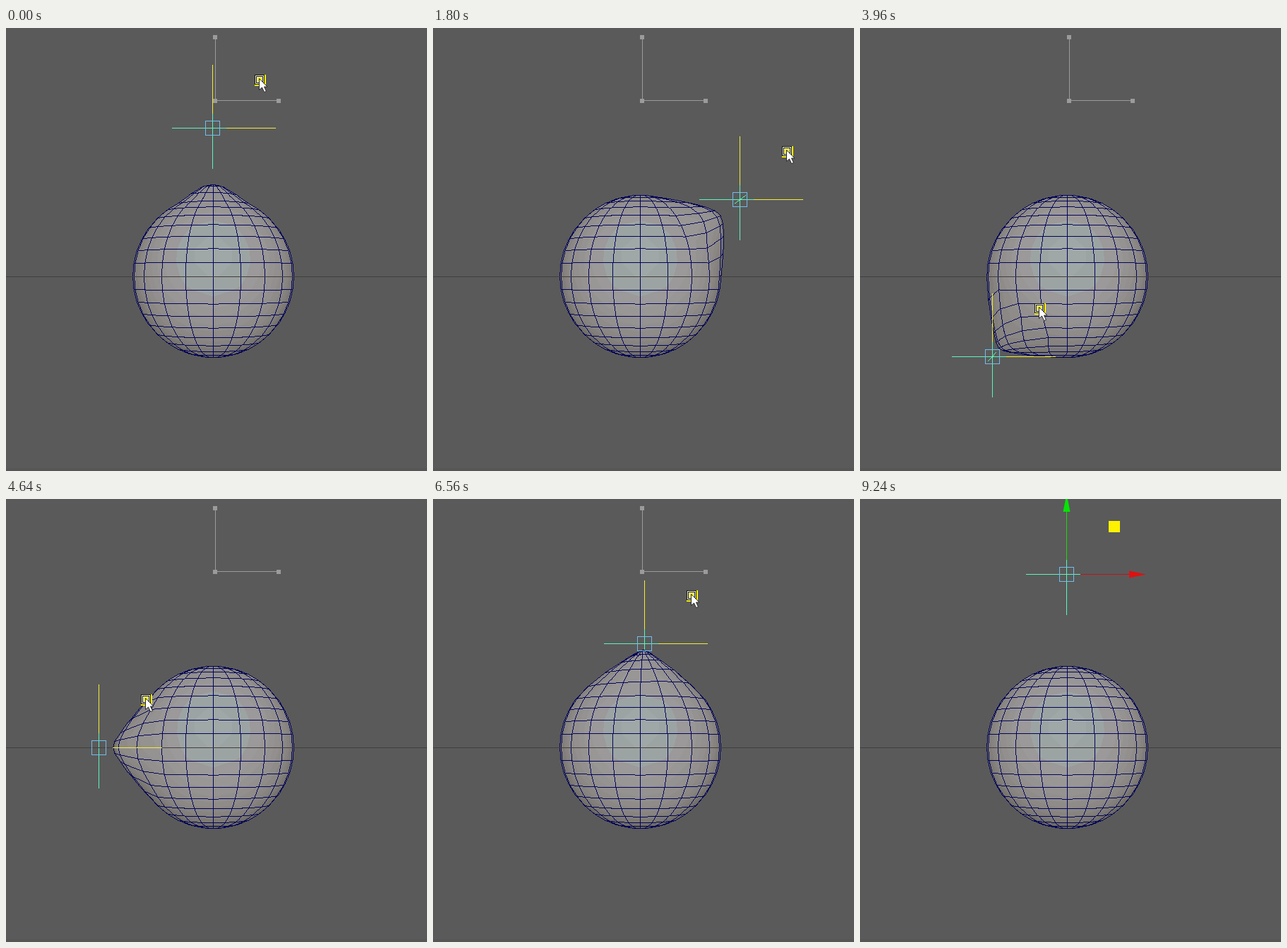
An HTML page with a canvas that plays this animation: 596x626 px, repeating every 9600 ms.

```html
<!DOCTYPE html>
<html lang="en">
<head>
<meta charset="utf-8">
<title>Sphere pulled by a handle</title>
<style>
  html, body { margin: 0; width: 100%; height: 100%; overflow: hidden; background: #5a5a5a; }
  canvas { display: block; }
</style>
</head>
<body>
<canvas id="stage" width="596" height="626"></canvas>
<script>
const W = 596, H = 626, LOOP = 9600, STEP = 40;
const CX = 293.5, CY = 351, R = 114, CAMERA = 1110, REACH = 115;
const ROWS = 20, COLS = 20, ARM = 57;
const RELEASE = 8800, CURSOR_OFF = 9120;

const ctx = document.getElementById('stage').getContext('2d');
const image = ctx.createImageData(W, H);
const pixels = new Uint32Array(image.data.buffer);
const pack = (r, g, b) => (255 << 24 | b << 16 | g << 8 | r) >>> 0;
const BACK = pack(90, 90, 90), WIRE = pack(2, 4, 88), TEAL = pack(92, 245, 189);
const GRID = pack(68, 61, 61), EDGE = pack(86, 86, 86);

// The handle circles the sphere: time, angle in degrees, distance
const orbit = [
  [0, -90.41, 210], [720, -75.7, 208], [1000, -75.7, 208], [1800, -37.8, 177.8],
  [2380, 0, 162], [2760, 48.32, 164.7], [3400, 87, 154], [3960, 133.3, 155.3],
  [4640, 180, 163], [5280, 220.64, 153.5], [6160, 272.14, 147.1], [6560, 272.14, 147.1],
  [7280, 269.61, 222], [7520, 269.61, 222], [7880, 269.66, 251], [8280, 269.65, 245], [LOOP, 269.65, 245]
];

function slope(i, k) {
  const p = orbit[i - 1], q = orbit[i], r = orbit[i + 1];
  if (!p || !r || p[k] === q[k] || q[k] === r[k]) return 0;
  return (r[k] - p[k]) / (r[0] - p[0]);
}

function handleAt(t) {
  const i = orbit.findIndex((key, n) => t < orbit[n + 1][0]);
  const a = orbit[i], b = orbit[i + 1], span = b[0] - a[0], u = (t - a[0]) / span, v = 1 - u;
  const [angle, dist] = [1, 2].map(k =>
    a[k] * (1 + 2 * u) * v * v + b[k] * u * u * (3 - 2 * u) +
    span * u * v * (slope(i, k) * v - slope(i + 1, k) * u));
  const rad = angle * Math.PI / 180;
  return [Math.round(CX + dist * Math.cos(rad)), Math.round(CY + dist * Math.sin(rad))];
}

// Banded grey, cooler where fully lit
const ramp = Array.from({ length: 15 }, (_, n) => {
  const v = n / 14, g = 90 + 72 * v ** 0.6;
  return v > 0.9 ? pack(g - 2, g + 6, g + 5) : pack(g + 1, g - 2, g - 9 + 9 * v);
});

const rest = [], faces = [];
for (let i = 0; i <= ROWS; i++) {
  for (let j = 0; j < (i % ROWS ? COLS : 1); j++) {
    const lat = Math.PI * i / ROWS, lon = 2 * Math.PI * j / COLS;
    rest.push([R * Math.sin(lat) * Math.sin(lon), -R * Math.cos(lat), R * Math.sin(lat) * Math.cos(lon)]);
  }
}
const id = (i, j) => i === 0 ? 0 : i === ROWS ? rest.length - 1 : 1 + (i - 1) * COLS + j % COLS;
for (let i = 0; i < ROWS; i++)
  for (let j = 0; j < COLS; j++)
    faces.push([id(i, j), id(i, j + 1), id(i + 1, j + 1), id(i + 1, j)]);

function project(v) {
  const k = CAMERA / (CAMERA - v.z);
  v.sx = CX + v.x * k;
  v.sy = CY + v.y * k;
  return v;
}

function pull([x, y, z], hx, hy) {
  const dx = hx - x, dy = hy - y;
  const w = Math.max(0, 1 - Math.hypot(dx, dy, z) / REACH);
  return project({ x: x + dx * w, y: y + dy * w, z: z - z * w, nx: 0, ny: 0, nz: 0 });
}

function light(v) {
  const lit = (-0.23 * v.ny + 0.973 * v.nz) / (Math.hypot(v.nx, v.ny, v.nz) || 1);
  v.shade = Math.max(0, lit) * (ramp.length - 1);
}

function fillTriangle(a, b, c) {
  const area = (b.sx - a.sx) * (c.sy - a.sy) - (b.sy - a.sy) * (c.sx - a.sx);
  if (Math.abs(area) < 1e-6) return;
  const xs = [a.sx, b.sx, c.sx], ys = [a.sy, b.sy, c.sy];
  const x0 = Math.max(0, Math.floor(Math.min(...xs))), x1 = Math.min(W - 1, Math.ceil(Math.max(...xs)));
  const y0 = Math.max(0, Math.floor(Math.min(...ys))), y1 = Math.min(H - 1, Math.ceil(Math.max(...ys)));
  for (let y = y0; y <= y1; y++) {
    for (let x = x0; x <= x1; x++) {
      const px = x + 0.5 - a.sx, py = y + 0.5 - a.sy;
      const u = (px * (c.sy - a.sy) - py * (c.sx - a.sx)) / area;
      const v = (py * (b.sx - a.sx) - px * (b.sy - a.sy)) / area;
      if (u < -1e-6 || v < -1e-6 || u + v > 1.000001) continue;
      pixels[y * W + x] = ramp[Math.round(a.shade + (b.shade - a.shade) * u + (c.shade - a.shade) * v)];
    }
  }
}

function wire(a, b, color) {
  const dx = b.sx - a.sx, dy = b.sy - a.sy;
  const n = Math.ceil(Math.max(Math.abs(dx), Math.abs(dy))) || 1;
  for (let i = 0; i <= n; i++) {
    const x = Math.floor(a.sx + dx * i / n), y = Math.floor(a.sy + dy * i / n);
    if (x >= 0 && x < W && y >= 0 && y < H) pixels[y * W + x] = color;
  }
}

// Three-axis cross, hidden where the sphere covers it
function drawLocator(x, y) {
  for (const [dx, dy, dz] of [[ARM, 0, 0], [0, ARM, 0], [0, 0, ARM]]) {
    const end = s => project({ x: x + 0.5 + s * dx, y: y + 0.5 + s * dy, z: s * dz });
    wire(end(-1), end(1), TEAL);
  }
}

function drawSphere(hx, hy) {
  const verts = rest.map(p => pull(p, hx, hy));
  const quads = faces.map(f => f.map(n => verts[n]));
  for (const q of quads) {
    const [a, b, c, d] = q;
    const ux = c.x - a.x, uy = c.y - a.y, uz = c.z - a.z;
    const vx = d.x - b.x, vy = d.y - b.y, vz = d.z - b.z;
    for (const p of new Set(q)) {
      p.nx += uy * vz - uz * vy;
      p.ny += uz * vx - ux * vz;
      p.nz += ux * vy - uy * vx;
    }
  }
  verts.forEach(light);
  const front = quads.filter(([a, b, c, d]) =>
    (c.sx - a.sx) * (d.sy - b.sy) - (c.sy - a.sy) * (d.sx - b.sx) > 0);
  const depth = q => q[0].z + q[1].z + q[2].z + q[3].z;
  front.sort((p, q) => depth(p) - depth(q));
  for (const [a, b, c, d] of front) {
    fillTriangle(a, b, c);
    fillTriangle(a, c, d);
  }
  for (const q of front) q.forEach((p, i) => wire(p, q[(i + 1) % 4], WIRE));
}

function drawScene(x, y) {
  pixels.fill(BACK);
  pixels.fill(EDGE, 622 * W);
  drawLocator(x - CX, y - CY);
  drawSphere(x - CX, y - CY);
  pixels.fill(GRID, CY * W, (CY + 1) * W);
  ctx.putImageData(image, 0, 0);
}

function box(color, x, y, w, h) {
  ctx.fillStyle = color;
  ctx.fillRect(x, y, w, h);
}

function frame(color, x, y, size) {
  ctx.strokeStyle = color;
  ctx.lineWidth = 1;
  ctx.strokeRect(x + 0.5, y + 0.5, size - 1, size - 1);
}

function polygon(color, x, y, points) {
  ctx.beginPath();
  for (const [px, py] of points) ctx.lineTo(x + px, y + py);
  ctx.closePath();
  ctx.fillStyle = color;
  ctx.fill();
}

function drawStart() {
  const gray = '#9b9b9b';
  box(gray, 296, 13, 1, 90);
  box(gray, 296, 102, 90, 1);
  for (const [x, y] of [[296, 13], [296, 103], [386, 103]]) box(gray, x - 3, y - 3, 6, 6);
}

function drawHandle(x, y, drag) {
  box(drag ? '#f4ee32' : '#c4121c', x + 20, y, 70, 1);
  box(drag ? '#f4ee32' : '#1ed60e', x, y - 89, 1, 69);
  if (!drag) {
    polygon('#e01010', x, y, [[89, -4.5], [113, 0.5], [89, 5.5]]);
    polygon('#04e604', x, y, [[-4.5, -88], [0.5, -113], [5.5, -88]]);
  }
  frame('#72bdec', x - 10, y - 10, 21);
  box('#fff200', x + 60, y - 75, 16, 16);
}

function drawCursor(x, y) {
  for (let i = 0; i < 4; i++) frame(i % 2 ? '#f4f4d8' : '#141414', x - 6 + i, y - 5 + i, 14 - 2 * i);
  polygon('#ffffff', x + 0.5, y + 0.5, [[0, 0], [0, 16], [4, 12.5], [7, 19], [10, 18], [7, 11.5], [11.5, 11.5]]);
  ctx.strokeStyle = '#2a2a2a';
  ctx.lineWidth = 1;
  ctx.stroke();
}

function draw(t) {
  const [x, y] = handleAt(t), drag = t < RELEASE;
  drawScene(x, y);
  if (drag) drawStart();
  drawHandle(x, y, drag);
  if (t < CURSOR_OFF) drawCursor(x + 66, y - 70);
}

const begin = performance.now();
let last = -1;
function tick() {
  const step = Math.floor(Math.max(0, performance.now() - begin) / STEP);
  if (step !== last) draw(step * STEP % LOOP);
  last = step;
  requestAnimationFrame(tick);
}
tick();
</script>
</body>
</html>
```
